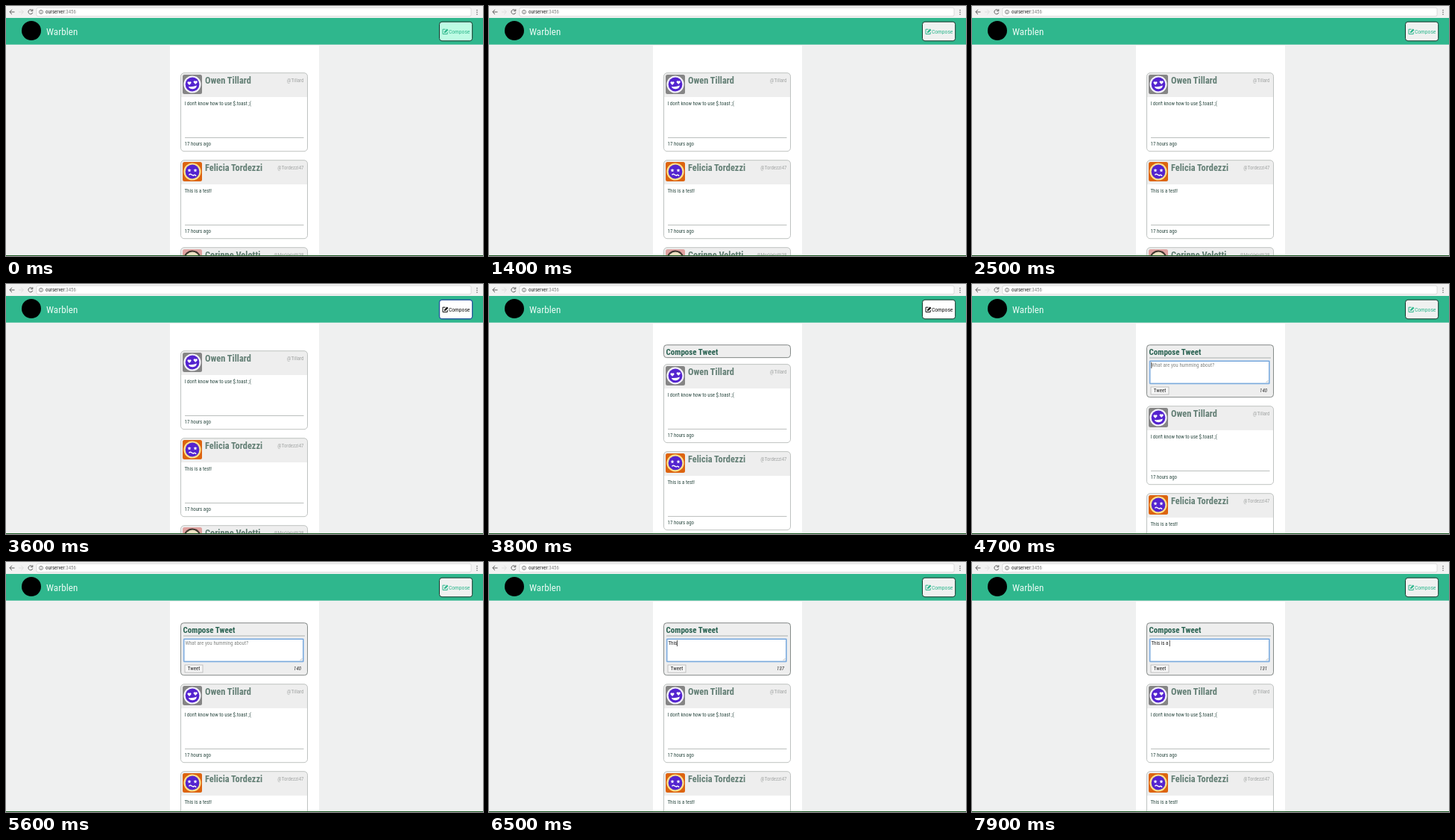
Recreate the animation shown at these times as an HTML page. Size 640 px wide and 335 px high, loop 8000 ms.

```html
<!DOCTYPE html>
<html lang="en">
<head>
<meta charset="utf-8">
<title>Compose demo</title>
<style>
  html, body { margin: 0; width: 100%; height: 100%; overflow: hidden; background: #eff0f0; }
  svg { display: block; width: 100vw; height: 100vh; }
  text { font: 6.9px "Roboto Condensed", Roboto, sans-serif; font-stretch: 75%; white-space: pre; }
  .name { font-size: 12.4px; font-weight: 700; fill: #637f75; }
  .handle { fill: #a3a6a5; text-anchor: end; }
  .body { fill: #2c4a42; }
  .brand { font-size: 13.2px; fill: #eafaf4; }
  .url { font-size: 6.9px; font-stretch: 100%; }
  .heading { font-size: 11px; font-weight: 700; fill: #27604f; }
  .hint { fill: #858886; font-size: 7.1px; }
  .action { font-size: 7.6px; fill: currentColor; }
  .count { font-style: italic; text-anchor: end; }
</style>
</head>
<body>
<svg id="stage" viewBox="0 0 640 335" preserveAspectRatio="none">
  <defs>
    <clipPath id="panelClip"><rect id="panelMask" x="234" y="81" width="171" height="71" rx="4"/></clipPath>
  </defs>
  <rect width="640" height="335" fill="#eff0f0"/>
  <rect x="220" y="53" width="200" height="282" fill="#fff"/>

  <g id="feed"></g>

  <g id="panel">
    <g clip-path="url(#panelClip)">
      <rect x="234" y="81" width="171" height="72" fill="#eeeeee"/>
      <text class="heading" x="237.5" y="95">Compose Tweet</text>
      <path d="M238 99H401" stroke="#aab0ae"/>
      <rect x="238.5" y="103" width="160.5" height="30.5" rx="1" fill="#fff" stroke="#b4cfec" stroke-width="2"/>
      <rect x="238.8" y="103.5" width="160" height="29.8" fill="none" stroke="#6b9fd8" stroke-width=".9"/>
      <path d="M394.5 132l3-3M396.5 132l1-1" stroke="#999" stroke-width=".6"/>
      <text id="hint" class="hint" x="240.5" y="111">What are you humming about?</text>
      <text id="draft" x="240.5" y="111.3" fill="#222"></text>
      <path id="caret" d="M0 104.8V113" stroke="#222" stroke-width=".8"/>
      <rect x="240" y="138" width="24" height="10" fill="#f6f6f6" stroke="#b4b4b4" stroke-width=".8"/>
      <text x="252" y="145.3" text-anchor="middle" fill="#222">Tweet</text>
      <text id="count" class="count" x="396" y="145.3" fill="#333">140</text>
    </g>
    <rect id="panelEdge" x="234.5" y="81.7" width="170" height="70" rx="4" fill="none" stroke="#858b89"/>
  </g>

  <rect width="640" height="16" fill="#f2f2f2"/>
  <rect x="41" y="2.3" width="583" height="11.4" rx="2" fill="#fff" stroke="#cfcfcf" stroke-width=".7"/>
  <g fill="none" stroke="#5d5d5d" stroke-width="1">
    <path d="M11.5 8H5M8 4.8L4.8 8L8 11.2"/>
    <path d="M17 8H23M20.3 4.8L23.5 8L20.3 11.2" stroke="#dedede"/>
    <path d="M35.3 6A3 3 0 1 0 35.8 8.8M35.8 4.3V6.8H33.3"/>
    <circle cx="47" cy="8" r="2.6" stroke-width=".7"/>
    <path d="M47 7.5V9.6M47 6.2V6.9" stroke-width=".8"/>
    <path d="M632 5V11.8" stroke-width="1.3" stroke-dasharray="1.3 1.4"/>
  </g>
  <text class="url" x="53" y="10.4" fill="#222">ourserver<tspan fill="#888">:3456</tspan></text>

  <rect y="16" width="640" height="35.7" fill="#2fb78d"/>
  <circle cx="34" cy="33" r="13" fill="#000"/>
  <text class="brand" x="54" y="38.6">Warblen</text>

  <g id="button">
    <rect id="buttonBox" x="581.5" y="21.2" width="44.2" height="25.6" rx="3.5"/>
    <g id="buttonInk">
      <path d="M589.6 31.2H586V37.6H592.2V35" fill="none" stroke="currentColor"/>
      <path d="M587.8 36.2L588.2 34.2L591.6 30.5L593.5 32.2L589.8 35.8Z" fill="currentColor"/>
      <text class="action" x="594" y="36.7">Compose</text>
    </g>
  </g>
  <path d="M0 334.5H640" stroke="#1c5a24"/>
</svg>
<script>
const LOOP = 8000;
const SLIDE = { start: 3670, length: 400 };
const HOVER = { start: 3000, press: 3500, release: 3800, end: 4400 };
const MESSAGE = "This is a ";
const KEYS = [5900, 6080, 6220, 6400, 6680, 6860, 7020, 7280, 7520, 7740];

const $ = id => document.getElementById(id);
const set = (id, attrs) => {
  for (const key in attrs) $(id).setAttribute(key, attrs[key]);
};

const star = (cx, cy, r) => {
  const points = Array.from({ length: 10 }, (_, i) => {
    const a = i * Math.PI / 5 - Math.PI / 2, d = i % 2 ? r * 0.45 : r;
    return `${(cx + d * Math.cos(a)).toFixed(2)},${(cy + d * Math.sin(a)).toFixed(2)}`;
  });
  return `<polygon points="${points.join(" ")}" fill="#fff"/>`;
};
const heart = (x, y) =>
  `<path d="M${x} ${y + 2.3}l-2.3 -2.4a1.3 1.3 0 0 1 2.3 -1.5a1.3 1.3 0 0 1 2.3 1.5z" fill="#fff"/>`;

const face = (back, ring, skin, details) =>
  `<rect x="237" y="2" width="26" height="26" rx="2.5" fill="${back}"/>
   <circle cx="250" cy="15" r="11.6" fill="${ring}"/>
   <circle cx="250" cy="15" r="9.4" fill="${skin}"/>${details}`;

const people = [
  { name: "Owen Tillard", handle: "@Tillard", body: "I don't know how to use $.toast ;(",
    avatar: face("#858585", "#f4f2fa", "#5424cf",
      heart(246, 13.6) + heart(254.2, 12.6) +
      `<path d="M244.8 18Q250.5 18.6 256 16.6Q255.2 21 250.8 21.3Q246.4 21.6 244.8 18Z" fill="#fff"/>`) },
  { name: "Felicia Tordezzi", handle: "@Tordezzi47", body: "This is a test!",
    avatar: face("#dd6410", "#fbe28c", "#5424cf",
      star(246, 13.3, 2.6) + star(254, 13.3, 2.6) +
      `<path d="M245.5 19.4Q247 17.4 249 19T252.2 19.6T255 20.8" fill="none" stroke="#fff" stroke-width="1.4"/>`) },
  { name: "Corinne Velotti", handle: "@MrsVelotti38", body: "",
    avatar: face("#dfa2a0", "#40362f", "#efe3c4", "") }
];

$("feed").innerHTML = people.map((p, i) => `
  <g transform="translate(0 ${90 + i * 117})">
    <rect x="234.5" y="-.3" width="170" height="105" rx="4.5" fill="#fff"/>
    <path d="M234.5 32V4.2a4.5 4.5 0 0 1 4.5 -4.5H400a4.5 4.5 0 0 1 4.5 4.5V32Z" fill="#eeeeee"/>
    <rect x="234.5" y="-.3" width="170" height="105" rx="4.5" fill="none" stroke="#bfc3c1"/>
    ${p.avatar}
    <text class="name" x="267" y="13.7">${p.name}</text>
    <text class="handle" x="399.5" y="12">${p.handle}</text>
    <text class="body" x="239.5" y="43">${p.body}</text>
    <path d="M240 86.5H399.5" stroke="#bbbfbd"/>
    <text class="body" x="239.5" y="97.3">17 hours ago</text>
  </g>`).join("");

const clamp = x => Math.max(0, Math.min(1, x));
const swing = x => 0.5 - Math.cos(Math.PI * clamp(x)) / 2;
const mix = (a, b, k) => `rgb(${a.map((v, i) => Math.round(v + (b[i] - v) * k))})`;

function drawButton(t) {
  const hovered = t >= HOVER.start && t < HOVER.end;
  const pressed = t >= HOVER.press && t < HOVER.release;
  const settle = clamp(t / 300);
  set("buttonBox", {
    fill: hovered ? "#fff" : mix([190, 251, 228], [239, 241, 240], settle),
    stroke: pressed ? "#2b5c9e" : "#17352c",
    "stroke-width": pressed ? 1.4 : 1
  });
  $("buttonInk").style.color = hovered ? "#111" : "#2fb78d";
}

function drawPanel(t) {
  const open = swing((t - SLIDE.start) / SLIDE.length);
  const height = 70 * open;
  set("feed", { transform: `translate(0 ${74 * open})` });
  set("panel", { visibility: open > 0 ? "visible" : "hidden" });
  set("panelMask", { height: height + 1 });
  set("panelEdge", { height });
}

function drawDraft(t) {
  const typed = KEYS.filter(k => k <= t).length;
  $("draft").textContent = MESSAGE.slice(0, typed);
  // The counter updates on key down, one character behind the text.
  $("count").textContent = 140 - Math.max(0, typed - 1);
  const since = t - (typed ? KEYS[typed - 1] : SLIDE.start);
  const x = 240.8 + (typed ? $("draft").getComputedTextLength() : 0);
  set("hint", { opacity: typed ? 0 : 1 });
  set("caret", { transform: `translate(${x} 0)`, opacity: since % 1000 < 500 ? 1 : 0 });
}

function render(t) {
  drawButton(t);
  drawPanel(t);
  drawDraft(t);
}

const begin = performance.now();
function tick() {
  render((performance.now() - begin) % LOOP);
  requestAnimationFrame(tick);
}
render(0);
requestAnimationFrame(tick);
</script>
</body>
</html>
```
